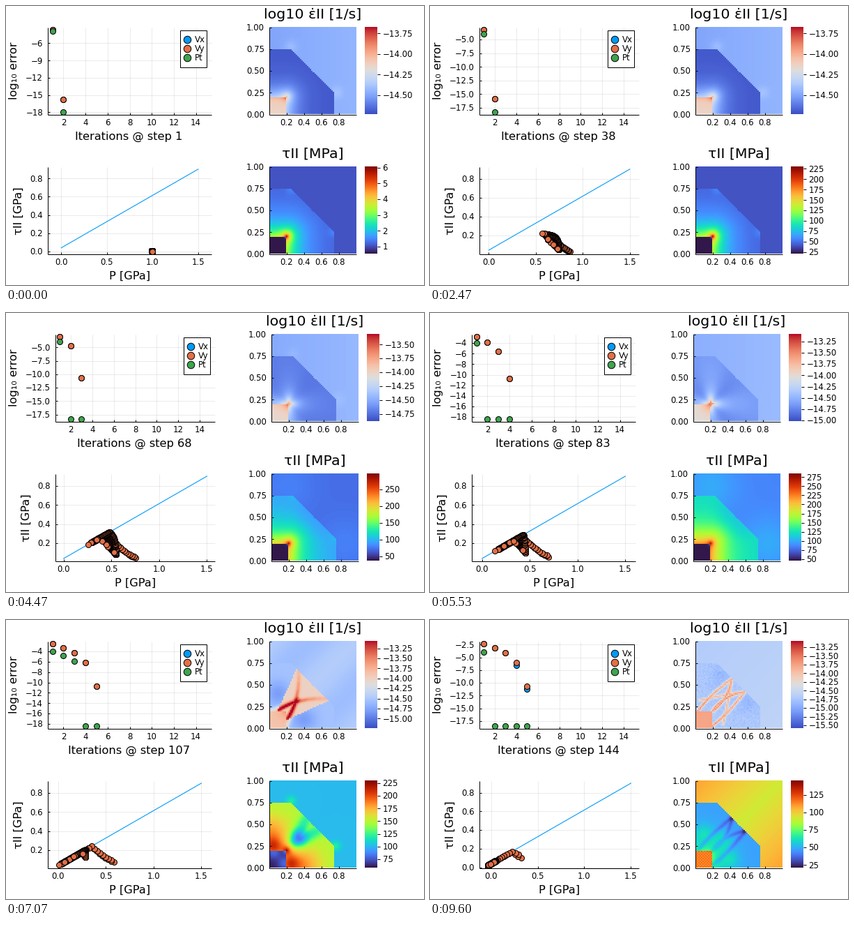
These frames come from a looping animation (600x400 px, 9.67 s). A matplotlib script:

```python
import numpy as np
import matplotlib.pyplot as plt
from matplotlib.animation import FuncAnimation
from matplotlib.collections import LineCollection
from matplotlib.patches import Rectangle

STEPS, LOOP = 145, 9670
W, H, DPI = 600, 400, 100
PT = 72 / DPI
TICK, GUIDE, TITLE = 11.7 * PT, 16.3 * PT, 20.5 * PT
BLUE, ORANGE, GREEN = "#009AFA", "#E36F47", "#3EA44E"
TOP, LOW, SIDE = 30.5, 230.5, 125

plt.rcParams["font.family"] = "DejaVu Sans"
rng = np.random.default_rng(3)


def ramp(step, start, end):
    return np.clip((step - start) / (end - start), 0, 1)


# ---------- fields on the quarter domain ----------
N = 62
c = (np.arange(N) + 0.5) / N
X, Y = np.meshgrid(c, c)
core = (X < 0.2) & (Y < 0.2)
octo = (X < 0.75) & (Y < 0.75) & (X + Y < 1)
edge = np.hypot(np.maximum(X - 0.2, 0), np.maximum(Y - 0.2, 0))
tip = np.hypot(X - 0.2, Y - 0.2)
phi = np.arctan2(Y - 0.2, X - 0.2)
noise = rng.normal(0, 1, (N, N))


def pair(x, y, r):
    """Soft spot and its mirror image about the diagonal."""
    return sum(np.exp(-((X - p) ** 2 + (Y - q) ** 2) / r ** 2) for p, q in ((x, y), (y, x)))


def arc(a, mid, b, width):
    """Shear band along a quadratic curve, together with its mirror image."""
    t = np.linspace(0, 1, 40)
    px, py = ((1 - t) ** 2 * p + 2 * t * (1 - t) * q + t ** 2 * r
              for p, q, r in zip(a, mid, b))
    near = np.min((X[..., None] - px) ** 2 + (Y[..., None] - py) ** 2, axis=2)
    one = np.exp(-near / width ** 2)
    return np.maximum(one, one.T)


def compose(outer, inside, inner):
    return np.clip(np.where(core, inner, np.where(octo, inside, outer)), 0, 1)


def strain_fields():
    elastic = compose(
        0.22 + 0.05 * X + 0.06 * pair(0.77, 0.25, 0.07),
        0.03 + 0.33 * np.exp(-edge / 0.11) + 0.3 * np.exp(-tip / 0.05),
        0.56 + 0.15 * np.exp((Y - 0.2) / 0.04) + 0.35 * np.exp(-tip / 0.03))
    onset = compose(
        0.25 + 0.04 * X,
        0.19 + 0.1 * np.cos(4 * phi) * np.exp(-tip / 0.3) + 0.7 * np.exp(-tip / 0.055),
        0.5 + 0.38 * np.exp(-tip / 0.07))
    angle = np.degrees(np.arctan2(Y, X))
    wedge = np.abs(angle - 45) < 20
    cross = arc((0.0, 0.1), (0.22, 0.36), (0.66, 0.34), 0.025)
    spread = compose(
        0.33 + 0.03 * np.cos(6 * (X - Y)),
        np.where(wedge, 0.57, 0.32 - 0.12 * pair(0.1, 0.4, 0.14))
        + 0.34 * cross * np.exp(-(tip / 0.4) ** 2)
        + 0.2 * arc((0.02, 0.2), (0.15, 0.24), (0.33, 0.33), 0.03),
        0.62 + 0.2 * np.exp(-tip / 0.06))
    webs = np.maximum(arc((0.03, 0.2), (0.15, 0.4), (0.55, 0.42), 0.018),
                      arc((0.1, 0.2), (0.36, 0.25), (0.42, 0.52), 0.018))
    banded = compose(
        0.34 + 0.02 * X,
        0.34 + 0.02 * noise - 0.1 * pair(0.22, 0.42, 0.08) + 0.5 * webs,
        0.68 + 0.2 * np.exp((np.maximum(X, Y) - 0.2) / 0.02))
    rays = np.maximum(arc((0.03, 0.2), (0.2, 0.42), (0.42, 0.56), 0.018),
                      arc((0.2, 0.2), (0.36, 0.3), (0.42, 0.56), 0.018))
    rays = np.maximum(rays, 0.8 * arc((0.05, 0.32), (0.3, 0.38), (0.55, 0.42), 0.016))
    final = compose(
        0.38 + 0.02 * (X - Y),
        0.34 + 0.015 * noise - 0.06 * pair(0.3, 0.6, 0.12) + 0.42 * rays,
        0.72 + 0 * X)
    return [elastic, onset, spread, banded, final]


def stress_fields():
    elastic = compose(
        0.09 + 0 * X,
        0.11 + 0.4 * np.exp(-edge / 0.16) + 0.45 * np.exp(-tip / 0.04)
        + 0.04 * pair(0.74, 0.25, 0.06),
        0.01 + 0.9 * np.exp(-tip / 0.008))
    onset = compose(
        0.17 + 0.06 * pair(0.2, 0.85, 0.3),
        0.3 + 0.42 * np.exp(-edge / 0.18) + 0.22 * np.exp(-tip / 0.03)
        - 0.05 * pair(0.55, 0.4, 0.15),
        0.01 + 0.5 * np.exp(-tip / 0.01))
    spread = compose(
        0.25 + 0.1 * pair(0.25, 0.76, 0.06),
        0.53 + 0.22 * pair(0.04, 0.24, 0.1) + 0.2 * pair(0.02, 0.38, 0.2)
        - 0.13 * pair(0.34, 0.34, 0.1) - 0.16 * arc((0.3, 0.3), (0.35, 0.42), (0.42, 0.54), 0.08)
        + 0.35 * np.exp(-tip / 0.05),
        0.02 + 0.1 * pair(0.05, 0.18, 0.08) + 0.4 * np.exp(-tip / 0.02))
    ridge = np.exp(-((X + Y - 0.8) / 0.22) ** 2 - ((X - Y) / 0.35) ** 2)
    banded = compose(
        0.53 + 0.02 * np.abs(X - Y),
        0.44 - 0.2 * ridge - 0.08 * pair(0.4, 0.4, 0.07)
        - 0.1 * arc((0.2, 0.25), (0.3, 0.4), (0.5, 0.47), 0.035)
        + 0.35 * np.exp(-edge / 0.03) * (noise > 0.3),
        0.37 + 0.45 * ((np.maximum(X, Y) > 0.17) & (noise > 0.2)))
    streaks = np.maximum(arc((0.03, 0.2), (0.2, 0.42), (0.42, 0.56), 0.025),
                         arc((0.2, 0.2), (0.36, 0.3), (0.42, 0.56), 0.025))
    final = compose(
        0.57 + 0.13 * np.minimum(np.abs(X - Y) * 1.1, 1),
        0.2 + 0.2 * np.exp(-edge / 0.12) + 0.08 * pair(0.1, 0.4, 0.1)
        + 0.04 * pair(0.33, 0.33, 0.12) - 0.1 * streaks - 0.1 * pair(0.42, 0.56, 0.035),
        0.77 + 0.02 * np.where(np.indices((N, N)).sum(0) % 2, 1, -1))
    return [elastic, onset, spread, banded, final]


STRAIN, STRESS = strain_fields(), stress_fields()


def blend(step, states):
    pos = np.interp(step, [52, 84, 107, 124, 145], range(5))
    j = min(int(pos), 3)
    return states[j] + (pos - j) * (states[j + 1] - states[j])


def strain_range(step):
    return -14.735 - 0.865 * ramp(step, 52, 145), -13.675 + 0.6 * ramp(step, 44, 84)


def stress_range(step):
    """Elastic growth until yielding limits it."""
    return (min(0.54 * step, 61 - 1.03 * (step - 105)),
            min(6.05 * step, 296, 282 - 2.28 * (step - 84)))


# ---------- stress states in the P-tau plane ----------
COHESION, SLOPE = 0.041, 0.5736


def make_cells():
    """Unloading rate and loading rate of every cell, per step."""
    u = np.linspace(0, 1, 60)
    t = np.linspace(0, 1, 15)
    bow = np.sin(np.pi * u)
    rates = [(0.0037 + 0.0043 * t + d, 0.0007 + 0.0033 * t ** 1.3 + d)
             for d in (0, 0.00025)]
    rates += [(0.0068 + 0.0043 * u - 0.0013 * v * bow, 0.0012 + 0.0045 * u + 0.0011 * v * bow)
              for v in np.linspace(0, 1, 8)]
    r = rng.random(9)
    rates.append((0.0068 + 0.005 * r, 0.0012 + 0.0046 * r))
    return [np.concatenate(part) for part in zip(*rates)]


UNLOAD, LOAD = make_cells()


def stress_points(step):
    p = 1 - UNLOAD * step - 0.004 * max(step - 100, 0)
    p = -0.04 + 0.2 * np.log1p(np.exp((p + 0.04) / 0.2))   # levels off in tension
    p += (1 - p.max()) * ramp(step, 10, 1)
    return p, np.minimum(LOAD * step, COHESION + SLOPE * p)


# ---------- Newton residuals ----------
def residuals(step):
    n = 2 + sum(step > k for k in (42, 68, 95, 115)) - (step > 135)
    settle = np.exp(-(step - 1) / 4)
    x = np.linspace(0, 1, n)
    first = -3.2 + 0.9 * ramp(step, 52, 124) - 0.44 * settle
    last = -15.8 if n == 2 else -10.7
    vel = first + (last - first) * (0.4 * x + 0.6 * x ** 5)
    pres = np.full(n, -18.2 - 0.002 * step + 0.25 * settle)
    pres[0] = -3.93
    if n == 5 and step < 120:
        pres[1:3] = -4.85, -5.85
    vx = vel.copy()
    vx[3:] -= 0.5 * ramp(step, 130, 145)
    return vx, vel, pres


# ---------- stage ----------
fig = plt.figure(figsize=(W / DPI, H / DPI), dpi=DPI, facecolor="white")
ax = fig.add_axes([0, 0, 1, 1])
ax.axis("off")


def picture(data, cmap):
    return ax.imshow(data, cmap=cmap, vmin=0, vmax=1, origin="lower",
                     aspect="auto", interpolation="nearest", zorder=0)


scale_strip = np.linspace(0, 1, 256)[:, None]
maps = [picture(STRAIN[0], "coolwarm"), picture(STRESS[0], "turbo")]
bars = [picture(scale_strip, "coolwarm"), picture(scale_strip, "turbo")]
ax.set_xlim(0, W)
ax.set_ylim(H, 0)

grid = LineCollection([], colors=[(0, 0, 0, 0.08)], linewidths=PT, zorder=1)
rules = LineCollection([], colors="black", linewidths=PT, zorder=2)
ax.add_collection(grid, autolim=False)
ax.add_collection(rules, autolim=False)
envelope, = ax.plot([], [], color=BLUE, lw=1.1 * PT, zorder=3)


def dots(color, size, z):
    return ax.plot([], [], "o", ms=size * PT, mfc=color, mec="black", mew=PT, zorder=z)[0]


cloud = dots(ORANGE, 8, 4)
series = [dots(col, 8, 4 + i) for i, col in enumerate((BLUE, ORANGE, GREEN))]
legend_box = ax.add_patch(Rectangle((0, 34.5), 38, 53, fc="white", ec="black", lw=PT, zorder=8))
legend_dots = [dots(col, 10.5, 9) for col in (BLUE, ORANGE, GREEN)]
live = []


def write(x, y, s, size=TICK, ha="center", **kw):
    live.append(ax.text(x, y, s, fontsize=size, ha=ha,
                        va=kw.pop("va", "baseline"), zorder=10, **kw))


def ticks(lo, hi, gap):
    return [k * gap for k in range(int(np.ceil(lo / gap)), int(np.floor(hi / gap)) + 1)]


def label(v, digits):
    return f"{v:.{digits}f}".replace("-", "\u2212")


def axes_box(x0, x1, y0, xs, ys, xdig, ydig, lines=None):
    """Axis lines, inward ticks and labels; xs and ys hold (pixel, value)."""
    y1 = y0 + SIDE
    segs = [[(x0, y0), (x0, y1)], [(x0, y1), (x1, y1)]]
    for px, v in xs:
        segs.append([(px, y1), (px, y1 - 3)])
        write(px, y1 + 15.4, label(v, xdig))
        if lines is not None:
            lines.append([(px, y0), (px, y1)])
    for py, v in ys:
        segs.append([(x0, py), (x0 + 3, py)])
        write(x0 - 7, py + 4.3, label(v, ydig), ha="right")
        if lines is not None:
            lines.append([(x0, py), (x1, py)])
    return segs


def stress_gap(lo, hi):
    if 110 < hi - lo < 250:
        return 25
    gaps = [m * 10 ** k for k in (2, 1, 0) for m in (5, 2, 1)]
    return next((g for g in gaps if len(ticks(lo, hi, g)) >= 4), 1)


def draw_residuals(step, x0, x1, gap, lines):
    parts = residuals(step)
    values = np.concatenate(parts[1:])
    pad = 0.03 * np.ptp(values)
    lo, hi = values.min() - pad, values.max() + pad
    ex = lambda n: x0 + (n - 0.58) / 14.84 * (x1 - x0)
    ey = lambda v: TOP + (hi - v) / (hi - lo) * SIDE
    for art, vals in zip(series, parts):
        art.set_data(ex(np.arange(1, len(vals) + 1)), ey(vals))
    write((x0 + x1) / 2 - 1, 192, f"Iterations @ step {step}", GUIDE)
    write(12, TOP + SIDE / 2, "log\u2081\u2080 error", GUIDE, rotation=90, va="center")

    legend_box.set_x(x1 - 45.5)
    for k, (art, name) in enumerate(zip(legend_dots, ("Vx", "Vy", "Pt"))):
        art.set_data([x1 - 35.5], [48 + 13 * k])
        write(x1 - 24.5, 52.2 + 13 * k, name, ha="left")
    return axes_box(x0, x1, TOP, [(ex(n), n) for n in range(2, 15, 2)],
                    [(ey(v), v) for v in ticks(lo, hi, gap)], 0, int(gap == 2.5), lines)


def draw_states(step, x0, x1, lines):
    p, tau = stress_points(step)
    end = COHESION + 1.5 * SLOPE
    ymin = min(tau.min(), COHESION)
    centre, mid = (min(p.min(), 0) + 1.5) / 2, (x0 + x1) / 2
    scale = SIDE / (1.06 * (end - ymin))     # same scale on both axes
    base = ymin - 0.03 * (end - ymin)
    half = (x1 - x0) / 2 / scale
    sx = lambda v: mid + (v - centre) * scale
    sy = lambda v: LOW + SIDE - (v - base) * scale
    envelope.set_data([sx(0), sx(1.5)], [sy(COHESION), sy(end)])
    cloud.set_data(sx(p), sy(tau))
    write(mid, 392, "P [GPa]", GUIDE)
    write(x0 - 42, LOW + SIDE / 2 + 1, "\u03c4II [GPa]", GUIDE, rotation=90, va="center")
    return axes_box(x0, x1, LOW,
                    [(sx(v), v) for v in ticks(centre - half, centre + half, 0.5)],
                    [(sy(v), v) for v in ticks(base, base + SIDE / scale, 0.2)],
                    1, 1, lines)


def draw_map(k, field, x, y0, lo, hi, gap, digits, title):
    y1, bx = y0 + SIDE, x + 137
    maps[k].set_data(field)
    maps[k].set_extent((x, x + 124.5, y1, y0))
    bars[k].set_extent((bx, bx + 17.5, y1, y0))
    segs = axes_box(x, x + 124.5, y0,
                    [(x + 124.5 * v, v) for v in (0.2, 0.4, 0.6, 0.8)],
                    [(y1 - SIDE * v, v) for v in (0, 0.25, 0.5, 0.75, 1)], 1, 2)
    for v in ticks(lo, hi, gap):
        py = y1 - (v - lo) / (hi - lo) * SIDE
        segs.append([(bx + 17.5, py), (bx + 22, py)])
        write(bx + 25.5, py + 4.3, label(v, digits), ha="left")
    write(x + 62, y0 - 12.5, title, TITLE)
    return segs


def draw(i):
    step = i + 1
    while live:
        live.pop().remove()
    # wider tick labels push the axes to the right
    wide = 7 <= step < 69 or step >= 114
    x0, x1, hx = (71, 300, 381) if wide else (60, 295, 378)
    gap = 2.5 if wide else 3 if step < 7 else 2
    s, t = strain_range(step), stress_range(step)
    lines = []
    segs = draw_residuals(step, x0, x1, gap, lines)
    segs += draw_states(step, x0, x1, lines)
    segs += draw_map(0, blend(step, STRAIN), hx, TOP, *s, 0.25, 2,
                     "log10 \u03b5\u0307II [1/s]")
    segs += draw_map(1, blend(step, STRESS), hx, LOW, *t, stress_gap(*t), 0,
                     "\u03c4II [MPa]")
    grid.set_segments(lines)
    rules.set_segments(segs)
    return []


anim = FuncAnimation(fig, draw, frames=STEPS, interval=LOOP / STEPS,
                     repeat=True, repeat_delay=0, blit=False)
plt.show()
```
